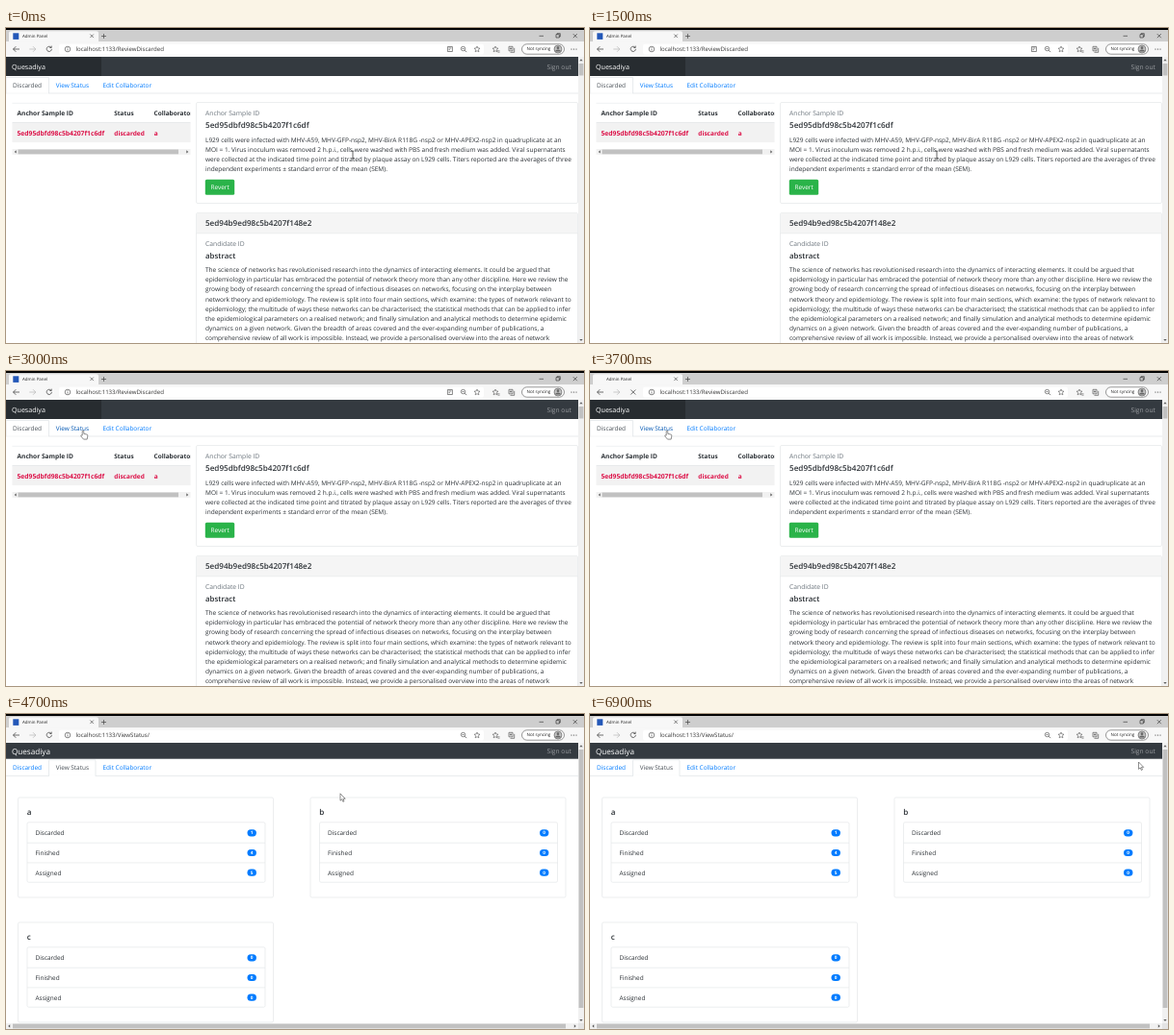
An HTML page for the animation above (7000 ms loop, 600 by 328 pixels).

```html
<!DOCTYPE html>
<html lang="en">
<head>
<meta charset="utf-8">
<title>Admin Panel</title>
<style>
  html, body { margin: 0; width: 100%; height: 100%; overflow: hidden; background: #fff; }
  svg { display: block; width: 600px; height: 328px; }
  text { font-family: "Open Sans", "Noto Sans", sans-serif; text-rendering: geometricPrecision; white-space: pre; }
</style>
</head>
<body>
<svg id="stage" viewBox="0 0 600 328"></svg>
<script>
const INK = '#2b3035', BLUE = '#007bff', EDGE = '#dfe2e5', ICON = '#555';

// y is the middle of the capitals
const text = (x, y, size, str, fill = INK, more = '') =>
  `<text x="${x}" y="${(y + size * .36).toFixed(2)}" font-size="${size}" fill="${fill}" ${more}>${str}</text>`;
const medium = 'font-weight="500"', semi = 'font-weight="600"', bold = 'font-weight="700"';
const rect = (x, y, w, h, fill, more = '') =>
  `<rect x="${x}" y="${y}" width="${w}" height="${h}" fill="${fill}" ${more}/>`;
const box = (x, y, w, h, r = 1.5) => rect(x, y, w, h, '#fff', `stroke="${EDGE}" stroke-width=".6" rx="${r}"`);
const line = (d, stroke = ICON, width = .7) =>
  `<path d="${d}" fill="none" stroke="${stroke}" stroke-width="${width}"/>`;
const solid = (d, fill = '#606060') => `<path d="${d}" fill="${fill}"/>`;
const circle = (x, y, r, fill, stroke = 'none') =>
  `<circle cx="${x}" cy="${y}" r="${r}" fill="${fill}" stroke="${stroke}" stroke-width=".7"/>`;
const group = (id, body) => `<g id="${id}">${body}</g>`;
const star = (x, y) => line(`M${x} ${y - 3}l.9 2 2.1.2-1.6 1.5.5 2.1-1.9-1.1-1.9 1.1.5-2.1-1.6-1.5 2.1-.2z`, ICON, .6);

function browser() {
  return rect(0, 0, 600, 2, '#000') + rect(0, 2, 600, 12.3, '#cecece')
    + rect(3, 3.2, 93, 12, '#f7f7f7', 'rx="2"') + rect(0, 14.3, 600, 15.7, '#f7f7f7')
    + group('favicon', rect(7.3, 5.3, 6, 6.6, '#2458b8'))
    + text(17, 8.3, 4.45, 'Admin Panel', '#222')
    + line('M87.3 6.5l3.6 3.6m0-3.6l-3.6 3.6M99 8.5h5m-2.5-2.5v5', '#333', .6)
    + line('M553.5 8.3h4.5M571 6.7h3.3v3.3h-3.3zM572 6.7v-1h3.3v3.3h-1M588.8 6.2l4 4m0-4l-4 4', '#222', .6)
    + line('M14 22H7.5m2.8-2.8L7.5 22l2.8 2.8', '#333')
    + line('M24.3 22h6.5m-2.8-2.8l2.8 2.8-2.8 2.8', '#b5b5b5')
    + rect(55, 16.8, 441, 10.6, '#fff', 'rx="2"')
    + group('reload', line('M46.8 20.2a2.6 2.6 0 1 0 .6 1.7M47.2 18.6v1.9h-1.9', '#333'))
    + group('stop', line('M42.3 19.5l5 5m0-5l-5 5', '#333'))
    + circle(64, 22, 2.8, 'none', ICON) + line('M64 21.5v2M64 20.2v.7', ICON)
    + `<text id="url" x="72.5" y="24.2" font-size="6.1" fill="#333"></text>`
    + group('pageIcon', line('M458.4 19.5h5v5h-5zM459.5 21h2.8M459.5 22.7h1.5'))
    + circle(474.5, 21.5, 2.2, 'none', ICON) + line('M476.1 23.1l2 2M473.5 21.5h2')
    + star(489, 22) + star(508, 22) + line('M510 23.8h2.5M510.5 25.2h2', ICON, .6)
    + line('M522 19.3h4v4.5h-4zM523.5 25.3h4.2v-4.5M524 20.3v2.4m-1.2-1.2h2.4')
    + rect(535.5, 16.8, 44, 10.4, '#fff', 'rx="5.2" stroke="#555" stroke-width=".6"')
    + text(540.5, 21.8, 4.55, 'Not syncing', '#222', medium)
    + circle(573, 22, 4, '#c4c4c4', '#666') + circle(573, 20.7, 1.4, '#666') + solid('M570.2 24.6a2.8 2.2 0 0 1 5.6 0z', '#666')
    + [587, 589.5, 592].map(x => circle(x, 22, .6, '#333')).join('');
}

function tabs(active, y) {
  const edges = [0, 44.5, 93];
  return line(`M0 ${y}H594`, EDGE, .7)
    + line(`M${edges[active]} ${y}v-16.5h${edges[active + 1] - edges[active]}v16.5`, EDGE, .7)
    + rect(edges[active] + .4, y - .6, edges[active + 1] - edges[active] - .8, 1.2, '#fff')
    + ['Discarded', 'View Status', 'Edit Collaborator'].map((label, i) =>
        text([7, 51.7, 100.5][i], y - 8.6, 6.45, label, i === active ? '#495057' : BLUE, `id="tab${active}${i}"`)).join('');
}

function verticalBar(bottom, thumbEnd) {
  return rect(594, 30, 6, bottom - 30, '#f1f1f1') + rect(594.6, 37, 4.8, thumbEnd - 37, '#c1c1c1')
    + solid(`M595.3 34.2l1.7-2 1.7 2zM595.3 ${bottom - 4}l1.7 2 1.7-2z`);
}

function horizontalBar(x, y, w, thumbX, thumbEnd) {
  return rect(x, y, w, 5.8, '#f1f1f1') + rect(thumbX, y + .5, thumbEnd - thumbX, 4.8, '#c1c1c1')
    + solid(`M${x + 4.2} ${y + 1.2}l-2 1.7 2 1.7zM${x + w - 4.2} ${y + 1.2}l2 1.7-2 1.7z`);
}

const sample = [
  'L929 cells were infected with MHV-A59, MHV-GFP-nsp2, MHV-BirA R118G -nsp2 or MHV-APEX2-nsp2 in quadruplicate at an',
  'MOI = 1. Virus inoculum was removed 2 h.p.i., cells were washed with PBS and fresh medium was added. Viral supernatants',
  'were collected at the indicated time point and titrated by plaque assay on L929 cells. Titers reported are the averages of three',
  'independent experiments ± standard error of the mean (SEM).'];
const abstract = [
  'The science of networks has revolutionised research into the dynamics of interacting elements. It could be argued that',
  'epidemiology in particular has embraced the potential of network theory more than any other discipline. Here we review the',
  'growing body of research concerning the spread of infectious diseases on networks, focusing on the interplay between',
  'network theory and epidemiology. The review is split into four main sections, which examine: the types of network relevant to',
  'epidemiology; the multitude of ways these networks can be characterised; the statistical methods that can be applied to infer',
  'the epidemiological parameters on a realised network; and finally simulation and analytical methods to determine epidemic',
  'dynamics on a given network. Given the breadth of areas covered and the ever-expanding number of publications, a',
  'comprehensive review of all work is impossible. Instead, we provide a personalised overview into the areas of network'];
const paragraph = (lines, y) => lines.map((s, i) => text(207, y + i * 10.12, 6.52, s)).join('');

function discardedPage() {
  const id = '5ed95dbfd98c5b4207f1c6df', red = '#dc1148';
  return rect(0, 30, 600, 20, '#343a40') + rect(0, 30, 99, 20, '#272c30')
    + text(6, 40.4, 7.1, 'Quesadiya', '#fff') + text(561.5, 40.2, 6.7, 'Sign out', '#9a9da0')
    + tabs(0, 68)
    + line('M6.5 78.3H191.5', EDGE, .5) + line('M6.5 98.7H191.5', EDGE, .9)
    + rect(6.5, 99.1, 185, 20, '#f2f2f2')
    + `<clipPath id="table"><path d="M6 78H191.5V120H6z"/></clipPath><g clip-path="url(#table)">`
    + text(11.5, 88.5, 6.6, 'Anchor Sample ID', INK, bold) + text(112.3, 88.5, 6.4, 'Status', INK, bold)
    + text(153.5, 88.5, 6.5, 'Collaborator', INK, bold)
    + text(11.5, 109.3, 6.75, id, red, bold) + text(112.3, 109.3, 6.5, 'discarded', red, bold)
    + text(153.7, 109.3, 6.5, 'a', red, bold) + '</g>'
    + horizontalBar(6.5, 126, 185, 12.5, 179)
    + box(197.5, 77.5, 396, 105) + text(207, 88.9, 6.75, 'Anchor Sample ID', '#6c757d', medium)
    + text(207, 101.2, 8.15, id, INK, semi) + paragraph(sample, 116.4)
    + rect(206.8, 157.8, 30.4, 16, '#2ab349', 'rx="1.6"') + text(212.4, 165.9, 6.5, 'Revert', '#fff')
    + box(197.5, 192.5, 396, 150) + rect(197.8, 192.8, 395.4, 20.8, '#f5f5f5')
    + line('M197.5 213.8H593.5', EDGE, .6)
    + text(207, 203.5, 8.1, '5ed94b9ed98c5b4207f148e2', INK, semi)
    + text(207, 224.2, 6.75, 'Candidate ID', '#6c757d', medium) + text(207, 236.7, 7.9, 'abstract', INK, semi)
    + paragraph(abstract, 251.9) + verticalBar(328, 49.5);
}

function statusCard(x, y, name, counts) {
  const rows = ['Discarded', 'Finished', 'Assigned'].map((label, i) => {
    const mid = y + 36.9 + i * 20.7;
    return (i ? line(`M${x + 9.5} ${mid - 10.4}h247`, EDGE, .6) : '')
      + text(x + 18, mid, 6.45, label)
      + rect(x + 238, mid - 3.7, 9.4, 7.2, BLUE, 'rx="3.6"')
      + text(x + 242.7, mid - .1, 4.7, counts[i], '#fff', bold + ' text-anchor="middle"');
  }).join('');
  return box(x, y, 265, 104) + text(x + 9.3, y + 14.8, 8.1, name, INK, semi)
    + box(x + 9.5, y + 25.8, 247, 62.4) + rows;
}

function statusPage() {
  return rect(0, 30, 594, 16.7, '#343a40')
    + text(6, 38.6, 8.15, 'Quesadiya', '#fff') + text(561.5, 38.6, 6.7, 'Sign out', '#9a9da0')
    + tabs(1, 64.4)
    + statusCard(12.5, 87, 'a', [1, 4, 5]) + statusCard(316, 87, 'b', [0, 0, 0])
    + statusCard(12.5, 217, 'c', [0, 0, 0])
    + verticalBar(322, 306) + horizontalBar(0, 322.1, 594, 7, 581) + rect(594, 322, 6, 6, '#e4e4e4');
}

const outlined = d => `<path d="${d}" fill="#fff" stroke="#444" stroke-width=".6" stroke-linejoin="round"/>`;
const pointers = {
  beam: line('M-1.5-4h1l.5.5.5-.5h1M0-3.5v7M-1.5 4h1l.5-.5.5.5h1', '#222', .7),
  arrow: outlined('M0 0V7.4L1.7 5.9 2.8 8.5 4 8 2.9 5.4H5.2z'),
  hand: outlined('M-.8 4.8V.6a.8.8 0 0 1 1.6 0V3l3.2.8q.9.3.8 1.2L4.2 8.8H.5L-2.2 5.6q-.2-1.1.7-1z')
};

const el = id => document.getElementById(id);
el('stage').innerHTML = rect(0, 0, 600, 328, '#fff')
  + group('discarded', discardedPage()) + group('status', statusPage()) + browser()
  + group('pointer', Object.entries(pointers).map(([id, body]) => group(id, body)).join(''));

const LOOP = 7000, LOAD = 3400, SWITCH = 3800;
const path = [[0, 360, 132], [1500, 360, 132], [2300, 120, 74], [3000, 80, 62.3],
  [4200, 80, 62.3], [5100, 538, 97.5], [5700, 538, 97.5], [6600, 569.5, 50], [LOOP, 569.5, 50]];

function pointerAt(t) {
  const i = path.findIndex(p => p[0] > t);
  const [t0, x0, y0] = path[i - 1], [t1, x1, y1] = path[i];
  const k = (t - t0) / (t1 - t0), e = k * k * (3 - 2 * k);
  return [x0 + (x1 - x0) * e, y0 + (y1 - y0) * e];
}

const show = (id, on) => el(id).setAttribute('visibility', on ? 'visible' : 'hidden');

function draw(now) {
  const t = Math.floor(now % LOOP / 100) * 100;
  const done = t >= SWITCH, loading = t >= LOAD && !done;
  show('discarded', !done);
  show('status', done);
  show('favicon', !loading);
  show('reload', !loading);
  show('stop', loading);
  show('pageIcon', t < LOAD);
  el('url').textContent = 'localhost:1133/' + (done ? 'ViewStatus/' : 'ReviewDiscarded');

  const [x, y] = pointerAt(t);
  const shape = x > 44 && x < 93 && y > 48 && y < 68 ? 'hand' : !done && x > 205 && y > 84 ? 'beam' : 'arrow';
  for (const id in pointers) show(id, id === shape);
  el('tab01').setAttribute('fill', shape === 'hand' ? '#0056b3' : BLUE);
  el('pointer').setAttribute('transform', `translate(${x} ${y})`);
  requestAnimationFrame(draw);
}
requestAnimationFrame(draw);
</script>
</body>
</html>
```
